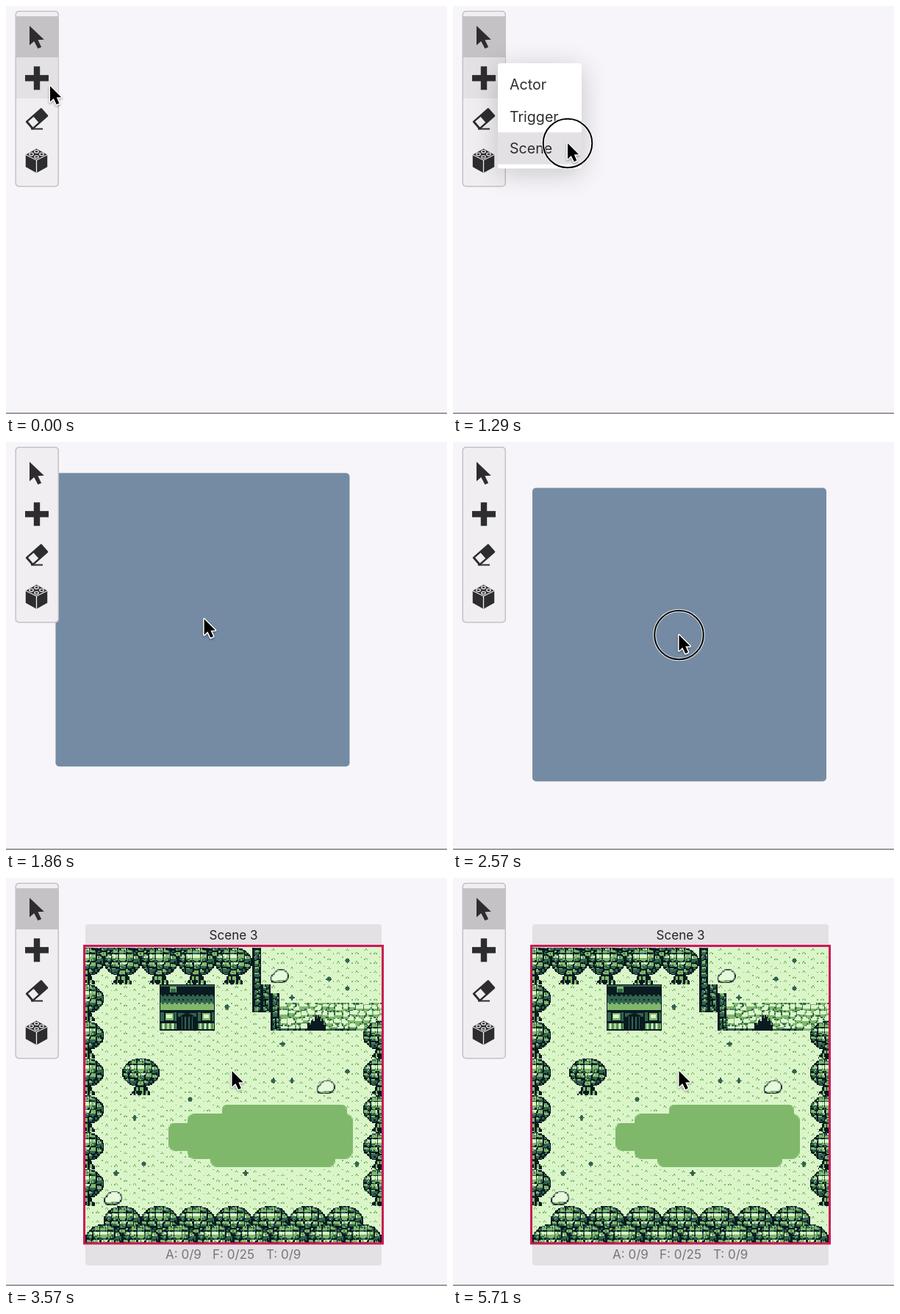
Write an HTML page with a canvas that moves like this. It is 600 px wide and 556 px high and loops after 5.85 s.

```html
<!DOCTYPE html>
<html lang="en">
<head>
<meta charset="utf-8">
<title>Adding a scene</title>
<style>
html, body { margin: 0; width: 100%; height: 100%; overflow: hidden; background: #f7f5f9; }
canvas { display: block; }
</style>
</head>
<body>
<canvas id="stage" width="600" height="556"></canvas>
<script>
const ctx = document.getElementById('stage').getContext('2d');
const LOOP = 5850, RATE = 7 / 1000;
const INK = '#2d2c2f', BAR = '#e4e1e5', PANEL = '#f0eef1';
const FONT = 'Inter, Roboto, sans-serif';
const PAL = ['#daf6c9', '#7fb86b', '#32644f', '#0a1a21'];

// Key steps; the picture changes RATE times per millisecond
const PRESS = 3, OPEN = 4, PICK = 9, DRAG = 10, REST = 16, DROP = 17, PLACED = 19;

const within = (v, a, b) => v >= a && v < b;
const progress = (s, a, b) => Math.min(1, Math.max(0, (s - a) / (b - a)));
const easeOut = (a, b, p, power) => a + (b - a) * (1 - (1 - p) ** power);

function pointerAt(s) {
  if (s < DRAG) {
    const p = progress(s, PRESS - 1, 7), q = p * p * (3 - 2 * p);
    return [60 + 96 * q, 109 + 78 * q];
  }
  const p = progress(s, DRAG, REST);
  return [easeOut(156, 307.5, p, 2), easeOut(187.5, 263, p, 1.8)];
}
function sceneAt(s) {
  const p = progress(s, DRAG, REST);
  return [easeOut(94, 308, p, 2.4), easeOut(100, 262.5, p, 3)];
}

function poly(c, pts, fill) {
  c.beginPath();
  pts.forEach(p => c.lineTo(p[0], p[1]));
  c.closePath();
  if (fill) { c.fillStyle = fill; c.fill(); }
}
function box(c, x, y, w, h, r, fill) {
  c.beginPath();
  c.roundRect(x, y, w, h, r);
  c.fillStyle = fill;
  c.fill();
}
function oval(c, x, y, rx, ry, fill) {
  c.beginPath();
  c.ellipse(x, y, rx, ry, 0, 0, 7);
  c.fillStyle = fill;
  c.fill();
}
function label(str, x, y, size, color, align = 'left') {
  ctx.font = size + 'px ' + FONT;
  ctx.textAlign = align;
  ctx.fillStyle = color;
  ctx.fillText(str, x, y);
}

// ---- Tile map, 256 x 256 pixels in 8 pixel tiles ----
function sheet(size) {
  const c = document.createElement('canvas');
  c.width = c.height = size;
  return c;
}
const hash = (i, j) => {
  const v = Math.sin(i * 127.1 + j * 311.7) * 43758.5;
  return v - Math.floor(v);
};
const dots = c => (tone, x, y, w = 1, h = 1) => { c.fillStyle = PAL[tone]; c.fillRect(x, y, w, h); };

// Irregular cells: distance to the cell's edge, and height below its middle
function cell(x, y, size) {
  let near = 99, next = 99, below = 0;
  const ci = Math.floor(x / size), cj = Math.floor(y / size);
  for (let i = ci - 1; i <= ci + 1; i++) for (let j = cj - 1; j <= cj + 1; j++) {
    const cy = (j + .15 + .7 * hash(j, i + 9)) * size;
    const d = Math.hypot(x - (i + .15 + .7 * hash(i, j)) * size, y - cy);
    if (d < near) { next = near; near = d; below = y - cy; }
    else if (d < next) next = d;
  }
  return { edge: next - near, below };
}

function treeSprite() {
  const sprite = sheet(32), px = dots(sprite.getContext('2d'));
  for (let y = 21; y < 32; y++) {
    const half = Math.round(5 + ((y - 21) / 10) ** 2 * 4);
    for (let x = -half; x < half; x++) {
      if (y === 31 && (x & 3) === 0) continue;
      px(hash(x, y >> 2) > .75 && Math.abs(x) < half - 1 ? 1 : 3, 16 + x, y);
    }
  }
  for (let y = 0; y < 25; y++) for (let x = 0; x < 32; x++) {
    const r = ((x - 15.5) / 16) ** 2 + ((y - 12) / 12.7) ** 2;
    if (r > 1) continue;
    const { edge, below } = cell(x, y, 6);
    let t = 1.5 - Math.hypot(x - 14, (y - 7) * 1.1) / 14;
    t += (edge < 1 ? -1.1 : below < -.5 ? .6 : -.1) + (hash(x, y) - .5) * .8;
    if (r > .85) t -= 1;
    px(t > 1.6 ? 0 : t > .8 ? 1 : t > 0 ? 2 : 3, x, y);
  }
  return sprite;
}

function buildMap() {
  const map = sheet(256), m = map.getContext('2d'), px = dots(m);
  const sprite = treeSprite();
  const tree = (tx, ty) => m.drawImage(sprite, tx * 8 - 16, ty * 8);

  function grass() {
    px(0, 0, 0, 256, 256);
    for (let y = 0; y < 32; y++) for (let x = 0; x < 32; x++) {
      const gx = x * 8 + 1, gy = y * 8 + 2 + (x & 1) * 3;
      for (let i = 0; i < 3; i++) px(1, gx + i, gy - (i & 1));
      px(1, gx + 5, gy + 3);
    }
    for (let n = 0; n < 26; n++) {
      const tx = Math.floor(hash(n, 3) * 28 + 3) * 8 + 2, ty = Math.floor(hash(n, 8) * 27 + 1) * 8 + 3;
      for (let d = -2; d <= 2; d++) px(2, tx + d, ty - 2 + Math.abs(d), 1, 5 - 2 * Math.abs(d));
    }
  }

  function pond() {
    box(m, 72, 152, 60, 24, 5, PAL[1]);
    box(m, 88, 144, 143, 39, 6, PAL[1]);
    box(m, 97, 150, 60, 33, 4, PAL[1]);
    box(m, 118, 136, 108, 30, 5, PAL[1]);
    box(m, 108, 160, 108, 30, 5, PAL[1]);
  }

  function rocks() {
    for (let y = 48; y < 72; y++) for (let x = 168; x < 256; x++) {
      const { edge, below } = cell(x, y, 6);
      const tone = edge < 1.1 ? (hash(x, y) < .45 ? 2 : 1) : below > 1.2 ? 1 : 0;
      px(y > 69 ? Math.min(3, tone + 1) : tone, x, y);
    }
    for (let i = -8; i < 8; i++) {
      const h = Math.round(14 - Math.abs(i) - (i % 3 ? 0 : 3));
      px(3, 200 + i, 72 - h, 1, h);
    }
  }

  function cliff(tx, ty, h) {
    for (let y = ty * 8; y < (ty + h) * 8; y++) for (let i = 0; i < 8; i++) {
      const { edge, below } = cell(tx * 8 + i, y, 5);
      px(i < 2 || i > 6 || edge < .8 ? 3 : below < 0 && hash(i, y) < .6 ? 1 : 2, tx * 8 + i, y);
    }
  }

  function boulder(tx, ty) {
    const x = tx * 8, y = ty * 8 + 3;
    for (const [grow, fill] of [[0, PAL[3]], [-1, '#e6fadb']]) {
      oval(m, x + 9, y + 6 + grow / 3, 7 + grow, 6 + grow, fill);
      oval(m, x + 4, y + 8 + grow / 3, 4 + grow, 4 + grow, fill);
    }
    px(1, x + 6, y + 9, 7, 1);
    px(1, x + 3, y + 10, 4, 1);
  }

  function house(x, y) {
    px(3, x, y, 48, 40);
    px(2, x + 1, y + 1, 46, 1);
    for (let i = 1; i < 47; i++) {
      const wave = (i >> 1) & 1;
      px(2, x + i, y + 9 + wave, 1, 8);
      px(1, x + i, y + 16 + wave, 1, 6 - wave);
      if (i % 4 === 0) px(3, x + i, y + 13);
    }
    px(1, x + 9, y + 2, 6, 5);
    px(2, x + 10, y + 4, 4, 3);
    for (const left of [x + 1, x + 33]) {
      px(2, left, y + 24, 14, 8);
      px(3, left + 3, y + 24, 9, 8);
      px(1, left + 4, y + 25, 7, 6);
      px(0, left + 5, y + 26, 5, 3);
      for (let i = 0; i < 14; i++) px(i % 4 ? (i % 4 === 2 ? 0 : 1) : 2, left + i, y + 34, 1, 5);
    }
    px(2, x + 16, y + 25, 16, 3);
    oval(m, x + 24, y + 31, 7, 6, PAL[3]);
    for (let i = 19; i < 30; i += 3) px(2, x + i, y + 28, 1, 11);
  }

  grass();
  pond();
  for (let x = 2; x < 16; x += 4) tree(x, -2);
  for (let x = 0; x <= 16; x += 4) tree(x, 0);
  rocks();
  cliff(18, 0, 7);
  cliff(19, 4, 3);
  cliff(20, 5, 4);
  house(64, 32);
  for (let y = 4; y < 28; y += 4) {
    tree(0, y);
    if (y > 4) tree(32, y);
  }
  tree(6, 12);
  boulder(20, 2);
  boulder(25, 14);
  boulder(2, 26);
  for (let x = 4; x <= 28; x += 4) tree(x, 28);
  for (let x = 2; x <= 30; x += 4) tree(x, 30);
  return map;
}
const map = buildMap();

// ---- Interface ----
const ARROW = [[0, 0], [0, 21.5], [4.8, 17], [8.8, 25.3], [12.4, 23.6], [8.8, 15.6], [15.2, 15.2]];

function plusIcon(x, y) {
  ctx.fillStyle = INK;
  ctx.fillRect(x - 16, y - 4.2, 32, 8.4);
  ctx.fillRect(x - 4.2, y - 16, 8.4, 32);
}

function eraserIcon(x, y) {
  ctx.save();
  ctx.translate(x, y);
  ctx.fillStyle = INK;
  ctx.fillRect(-8, 12, 16, 2);
  ctx.rotate(-.72);
  box(ctx, -14, -8, 29, 15, 1.5, INK);
  ctx.fillStyle = PANEL;
  ctx.fillRect(-11, -5.5, 10, 10);
  ctx.restore();
}

function brickIcon(x, y) {
  const corner = k => [x + 17 * Math.sin(k * Math.PI / 3), y - 16.5 * Math.cos(k * Math.PI / 3)];
  poly(ctx, [0, 1, 2, 3, 4, 5].map(corner), INK);
  ctx.strokeStyle = PANEL;
  ctx.lineWidth = 1.3;
  ctx.beginPath();
  for (const k of [1, 3, 5]) {
    ctx.moveTo(x, y - 1);
    ctx.lineTo(...corner(k));
  }
  ctx.stroke();
  for (let k = 0; k < 4; k++) {
    const a = k * Math.PI / 2;
    ctx.beginPath();
    ctx.ellipse(x + 7 * Math.cos(a), y - 9 + 3.6 * Math.sin(a), 2.8, 1.8, 0, 0, 7);
    ctx.stroke();
  }
}

function toolbar(s) {
  box(ctx, 12.5, 6.5, 59.5, 240, 5, '#c3c2c5');
  box(ctx, 14, 8, 56.5, 237, 4, PANEL);
  ctx.fillStyle = '#c4c2c5';
  if (s < DRAG || s >= PLACED) ctx.fillRect(13, 14, 58.5, 56);
  ctx.fillStyle = BAR;
  if (s < DRAG) ctx.fillRect(14, 70, 57, 56);

  poly(ctx, ARROW.map(([x, y]) => [32 + x * 1.3, 27 + y * 1.23]), INK);
  plusIcon(42, 98.3);
  eraserIcon(42, 154.5);
  brickIcon(41.5, 211);
}

function menu(y) {
  const rowH = 43.6;
  ctx.save();
  ctx.shadowColor = 'rgba(0,0,0,.2)';
  ctx.shadowBlur = 36;
  ctx.shadowOffsetY = 6;
  box(ctx, 61, 78, 114, 143.5, 4, '#fff');
  ctx.restore();
  ['Actor', 'Trigger', 'Scene'].forEach((name, i) => {
    const top = 85 + i * rowH;
    if (within(y, top, top + rowH)) {
      ctx.fillStyle = BAR;
      ctx.fillRect(61, top, 114, rowH);
    }
    label(name, 77, top + 29, 19.6, INK);
  });
}

function placedScene() {
  box(ctx, 108, 63, 403, 465, 4, BAR);
  label('Scene 3', 309.5, 84, 17, '#222124', 'center');
  ['A: 0/9', 'F: 0/25', 'T: 0/9'].forEach((s, i) => label(s, 217 + i * 68.5 - (i & 1) * 4.5, 518.5, 17, '#777579'));
  ctx.imageSmoothingEnabled = false;
  ctx.drawImage(map, 108, 94.5, 403, 403);
  ctx.strokeStyle = '#cb1a54';
  ctx.lineWidth = 3;
  ctx.strokeRect(106.5, 92.5, 406, 405.5);
}

function arrow() {
  ctx.lineJoin = 'round';
  ctx.shadowColor = 'rgba(0,0,0,.35)';
  ctx.shadowBlur = 3;
  ctx.shadowOffsetY = 1.5;
  poly(ctx, ARROW);
  ctx.strokeStyle = '#fff';
  ctx.lineWidth = 3;
  ctx.stroke();
  ctx.shadowColor = 'transparent';
  ctx.fillStyle = '#000';
  ctx.fill();
}

function hand() {
  const shape = new Path2D();
  for (let i = 0; i < 4; i++) shape.roundRect(-2 + i * 4, i ? 7 + i : 0, 4, 14, 2);
  shape.roundRect(-2, 13, 16, 8, 3);
  shape.roundRect(1, 15, 11.5, 10, 2);
  const thumb = new Path2D();
  thumb.ellipse(-2, 15, 6, 2.2, .9, 0, 7);
  shape.addPath(thumb);
  ctx.strokeStyle = '#000';
  ctx.lineWidth = 2.8;
  ctx.stroke(shape);
  ctx.fillStyle = '#fff';
  ctx.fill(shape);
  ctx.fillStyle = '#000';
  for (let i = 0; i < 3; i++) ctx.fillRect(3 + i * 3, 16, 1.1, 5);
}

function ring(x, y) {
  ctx.beginPath();
  ctx.arc(x, y, 33.3, 0, 7);
  ctx.strokeStyle = 'rgba(255,255,255,.85)';
  ctx.lineWidth = 4;
  ctx.stroke();
  ctx.strokeStyle = '#000';
  ctx.lineWidth = 2;
  ctx.stroke();
}

function draw(t) {
  const s = Math.floor((t + 8) * RATE);
  ctx.fillStyle = '#f7f5f9';
  ctx.fillRect(0, 0, 600, 556);
  ctx.fillStyle = '#626164';
  ctx.fillRect(0, 554.4, 600, 1.2);

  if (within(s, DRAG, PLACED)) {
    const [cx, cy] = sceneAt(s);
    box(ctx, cx - 200, cy - 200, 400, 400, 5, '#758ba4');
  }
  if (s >= PLACED) placedScene();
  toolbar(s);

  const [x, y] = pointerAt(s);
  if (within(s, OPEN, DRAG)) menu(y);
  if (s === PRESS || s === PICK || within(s, DROP, PLACED)) ring(x, y);
  ctx.save();
  ctx.translate(x, y);
  s === DRAG ? hand() : arrow();
  ctx.restore();
}

const start = performance.now();
function tick() {
  draw((performance.now() - start) % LOOP);
  requestAnimationFrame(tick);
}
tick();
</script>
</body>
</html>
```
